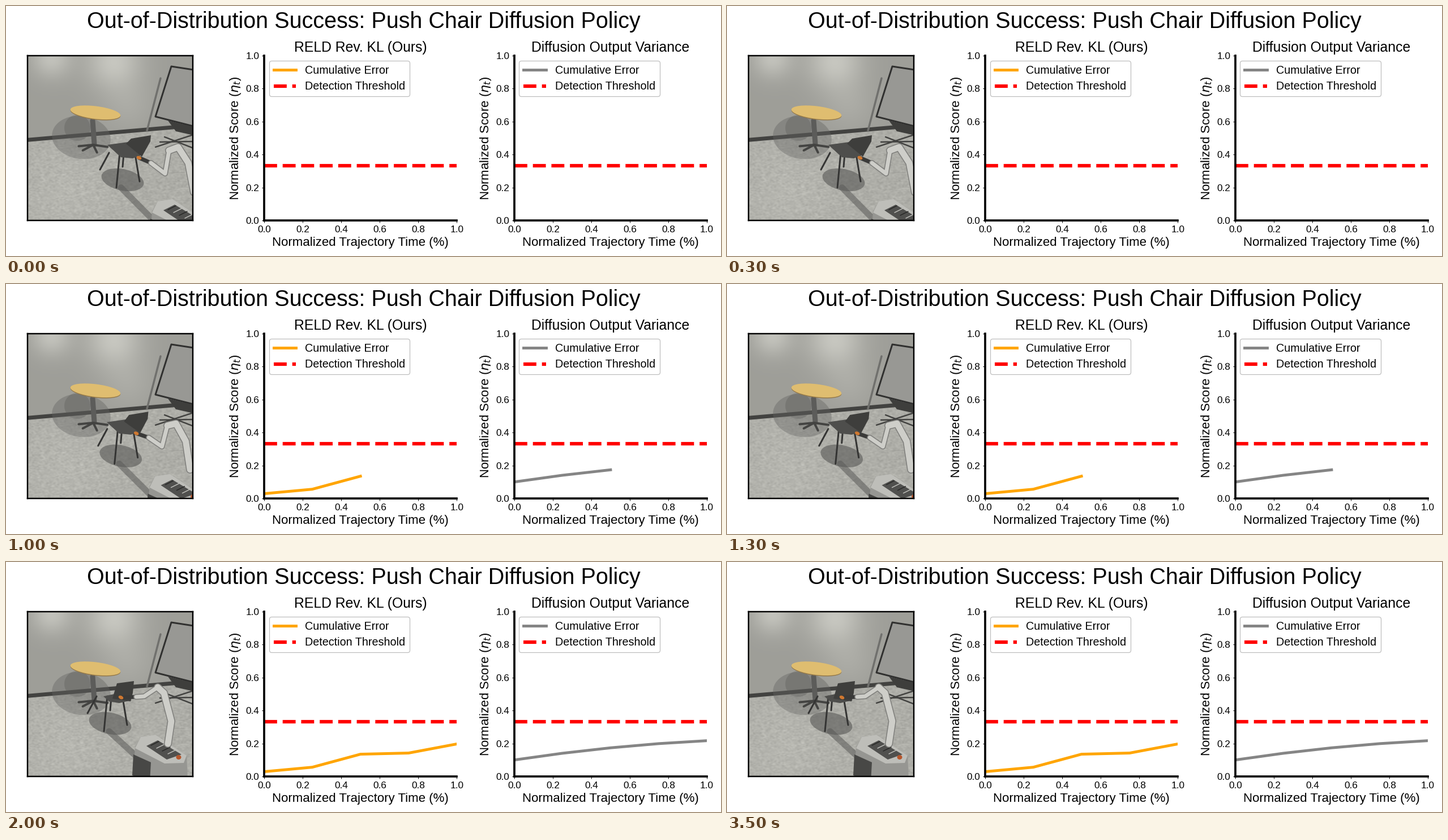
These frames come from a looping animation (1263x443 px, 4500 ms). A matplotlib script:

```python
import matplotlib.pyplot as plt
import numpy as np
from matplotlib.animation import FuncAnimation
from matplotlib.patches import Ellipse, Polygon

W, H, DPI = 1263, 443, 64
S = 88.9 / DPI          # layout is designed in points at 88.9 dpi
PX = 72 / DPI           # one pixel in points

plt.rcParams.update({
    "font.family": "Liberation Sans",
    "axes.titlesize": 20 * S, "axes.titlepad": 6 * S,
    "axes.labelsize": 18 * S, "axes.labelpad": 4 * S,
    "axes.linewidth": 3 * S, "patch.linewidth": S,
    "legend.fontsize": 16 * S, "legend.edgecolor": "0.68",
    "legend.borderaxespad": 0.44,
})
for axis in ("xtick", "ytick"):
    plt.rcParams.update({
        f"{axis}.labelsize": 14 * S, f"{axis}.major.size": 3.5 * S,
        f"{axis}.major.width": 0.8 * S, f"{axis}.major.pad": 3.5 * S,
    })

fig = plt.figure(figsize=(W / DPI, H / DPI), dpi=DPI, facecolor="white")
fig.suptitle("Out-of-Distribution Success: Push Chair Diffusion Policy", fontsize=32 * S)


def add_box(left, top, right, bottom):
    return fig.add_axes([left / W, 1 - bottom / H, (right - left) / W, (bottom - top) / H])


def add_chart(left, title, color):
    ax = add_box(left, 88, left + 340.2, 380)
    ax.set(xlim=(0, 1), ylim=(0, 1), title=title,
           xlabel="Normalized Trajectory Time (%)",
           ylabel=r"Normalized Score ($\eta_t$)")
    ax.spines[["top", "right"]].set_visible(False)
    curve, = ax.plot([], [], color=color, lw=4 * S, label="Cumulative Error")
    ax.plot([0, 1], [0.333, 0.333], "--", color="red", lw=5 * S,
            label="Detection Threshold")
    ax.legend(loc="upper left")
    return curve


TIMES = np.linspace(0, 1, 5)
CHARTS = [
    (add_chart(456, "RELD Rev. KL (Ours)", "orange"), [0.029, 0.056, 0.135, 0.142, 0.197]),
    (add_chart(897.8, "Diffusion Output Variance", "#858585"),
     0.1 + 0.178 * TIMES - 0.061 * TIMES ** 2),
]

# Camera view, drawn in stage pixels.
photo = add_box(37.5, 88, 330.4, 380.3)
photo.set(xticks=[], yticks=[])
for spine in photo.spines.values():
    spine.set_linewidth(2 * S)


def gray(tone):
    return (tone / 255, tone / 255, tone * 0.975 / 255)


def shape(points, color, alpha=1):
    return photo.add_patch(Polygon(points, fc=color, lw=0, alpha=alpha, zorder=2))


def oval(center, w, h, color, angle=0, alpha=1):
    return photo.add_patch(Ellipse(center, w, h, angle=angle, fc=color, lw=0,
                                   alpha=alpha, zorder=2))


def stroke(points, width, color, alpha=1):
    line, = photo.plot(*zip(*points), color=color, lw=width * PX, alpha=alpha, zorder=2,
                       solid_capstyle="round", solid_joinstyle="round")
    return line


def paint_room():
    x, y = np.meshgrid(np.arange(38, 330, 2) + 1, np.arange(88, 380, 2) + 1)

    def glow(cx, cy, radius):
        return np.exp(-((x - cx) ** 2 + (y - cy) ** 2) / radius ** 2)

    wall = 158 + 36 * glow(80, 92, 35) + 40 * glow(190, 98, 48) + 12 * glow(215, 175, 45)
    noise = np.random.default_rng(4).normal(0, 8, x.shape)
    floor = 174 + 8 * glow(110, 330, 80) + (noise + np.roll(noise, 1, 1)) / 2
    tone = np.where(y < 238 - (x - 38) * 0.087, wall, floor)
    rgb = np.clip(tone[..., None] * [1, 1, 0.965] / 255, 0, 1)
    photo.imshow(rgb, extent=(38, 330, 380, 88), aspect="auto", interpolation="bilinear")
    stroke([(30, 238), (340, 211)], 7, gray(66))

    # Screen, pole and tripod
    screen = [(331, 113), (292, 107), (264, 196), (331, 213)]
    shape(screen, gray(152))
    stroke(screen, 3, gray(48))
    stroke([(273, 128), (249, 221)], 3.5, gray(112))
    shape([(286, 203), (331, 214), (331, 229), (300, 222)], gray(62))
    for i in range(3):
        stroke([(264 + 8 * i, 250 - 9 * i), (331, 228 + 12 * i)], 2.5, gray(66))

    # Table with its shadow
    oval((133, 233), 104, 76, gray(100), 8, 0.4)
    oval((126, 216), 46, 46, gray(85), 10, 0.3)
    stroke([(153, 203), (156, 245)], 9, gray(92))
    for angle in np.radians([15, 75, 135, 170]):
        stroke([(154, 246), (154 + 26 * np.cos(angle), 246 + 14 * np.sin(angle))], 4, gray(68))
    oval((158, 190), 89, 23, "#94794a", 7)
    oval((158, 188.7), 89, 22.5, "#dfbd70", 7)


def glide(start, end, push):
    return (1 - push) * np.array(start) + push * np.array(end)


def draw_chair(push):
    shift = push * np.array([-22, -22])
    feet = np.array([(166, 290), (195, 322), (236, 311), (206, 285)]) + shift
    center = np.array([212, 260]) + shift
    seat = glide([(179, 246), (216, 241), (240, 264), (224, 270), (203, 268)],
                 [(172, 238), (196, 233), (222, 245), (200, 250), (182, 247)], push)
    back = glide([(212, 244), (221, 235), (256, 229), (255, 240), (240, 267)],
                 [(188, 242), (196, 215), (226, 211), (224, 232), (220, 247)], push)
    parts = [oval(center + (-6, 48), 76, 38, gray(88), 12, 0.6)]
    for foot in feet:
        top = (foot[0] + 0.35 * (center[0] - foot[0]), center[1])
        parts.append(stroke([top, foot], 3, gray(52)))
    return parts + [shape(seat, gray(78)), shape(back, gray(62))]


def draw_arm(push):
    joints = glide(
        [(235, 269), (256, 278), (281, 297), (288, 256), (304, 250), (322, 278), (332, 330)],
        [(203, 240), (230, 239), (244, 238), (268, 222), (279, 232), (292, 282), (286, 322)],
        push)
    return [stroke(joints[:2], 7, gray(58)),
            oval(joints[0], 9, 6, "#d07830", 25),
            stroke(joints[1:4], 10, gray(125)), stroke(joints[3:], 14, gray(125)),
            stroke(joints[1:4], 7, gray(206)), stroke(joints[3:], 11, gray(206))]


def draw_base(push):
    shift = (1 - push) * np.array([30, 36])

    def block(points, tone):
        return shape(points + shift, gray(tone))

    parts = [
        stroke([(182 + 0.7 * shift[0], 300 + 0.6 * shift[1]), (232, 346) + 0.9 * shift],
               11, gray(90), 0.55),
        block([(224, 385), (228, 328), (238, 310), (264, 306), (319, 343), (321, 385)], 150),
        block([(228, 330), (238, 310), (264, 306), (319, 343), (314, 356), (280, 357)], 190),
        block([(248, 326), (268, 316), (310, 341), (284, 350)], 80),
        block([(225, 341), (256, 355), (254, 390), (223, 378)], 72),
        oval((305, 346) + shift, 9, 8, "#b5562c"),
    ]
    for i in range(4):
        corner = np.array([256 + 10 * i, 325 + 5 * i]) + shift
        parts.append(stroke([corner, corner + (14, -7)], 1.5, gray(190 if i % 2 else 40)))
    return parts


PUSH = [0, 0.03, 0.15, 0.8, 1]
paint_room()
POSES = [draw_chair(push) + draw_base(push) + draw_arm(push) for push in PUSH]
photo.set(xlim=(37.5, 330.4), ylim=(380.3, 88))


def update(frame):
    step = min(frame, len(PUSH) - 1)
    count = step + 1 if step else 0
    for curve, scores in CHARTS:
        curve.set_data(TIMES[:count], scores[:count])
    for i, parts in enumerate(POSES):
        for part in parts:
            part.set_visible(i == step)
    return []


anim = FuncAnimation(fig, update, frames=9, interval=500, repeat=True, repeat_delay=0)
plt.show()
```
